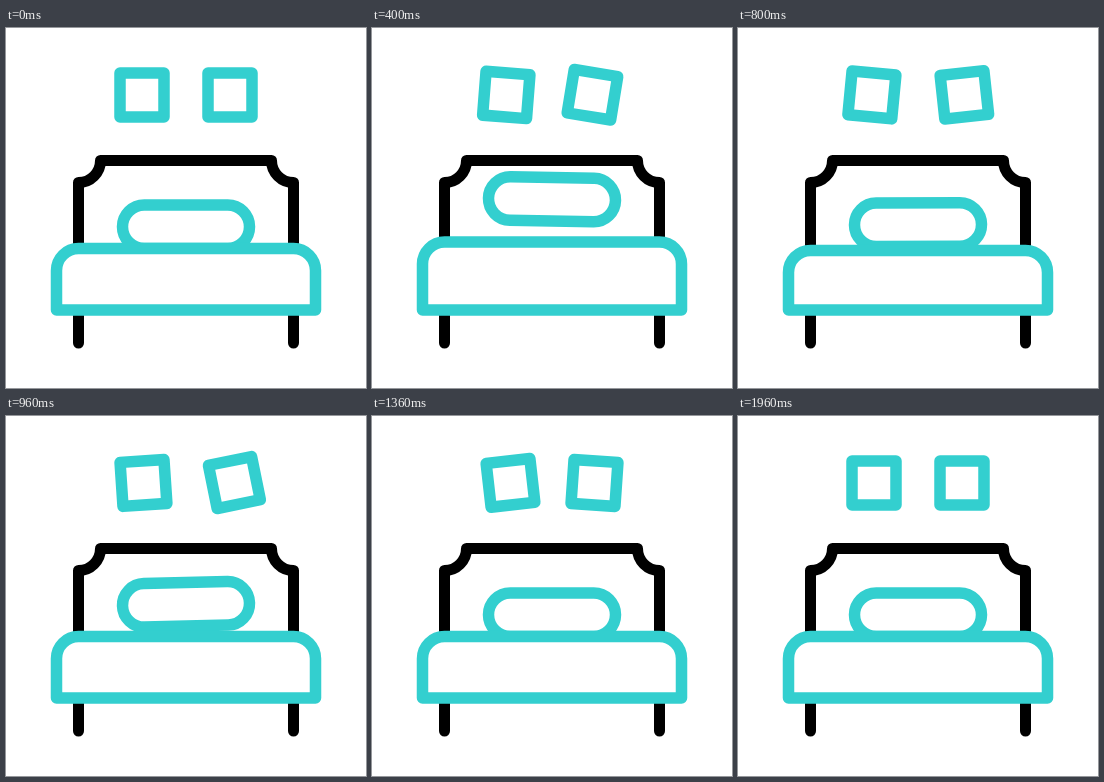
Animation of 360x360 px, one loop 2000 ms. Source, as an HTML page:

```html
<!DOCTYPE html>
<html lang="en">
<head>
<meta charset="utf-8">
<title>Bed</title>
<style>
html, body { margin: 0; width: 100%; height: 100%; overflow: hidden; background: #fff; }
svg { display: block; width: 100vw; height: 100vh; }
</style>
</head>
<body>
<svg viewBox="0 0 360 360" fill="none" stroke="#33cfcf" stroke-width="11.5" stroke-linecap="round" stroke-linejoin="round">
  <rect id="left" x="114" y="45" width="44" height="44"/>
  <rect id="right" x="202" y="45" width="44" height="44"/>
  <path stroke="#000" stroke-width="11" d="M72.5 240V154.5A22 22 0 0 0 94.5 132.5H265.5A22 22 0 0 0 287.5 154.5V240M72.5 282V315M287.5 282V315"/>
  <rect id="pillow" x="116.5" y="177" width="127" height="43.5" rx="21.75"/>
  <path id="blanket" fill="#fff"/>
</svg>
<script>
const LOOP = 2000;
const [left, right, pillow, blanket] =
  ["left", "right", "pillow", "blanket"].map(id => document.getElementById(id));

// Keys are [time, value] pairs, eased in and out between neighbours.
const leftKeys = [[220, 0], [620, 10.5], [1190, -11.5], [1680, 7], [1960, 0]];
const rightKeys = [[20, 0], [480, 10], [960, -11.5], [1440, 5], [1920, 0]];
const blanketKeys = [[60, 0], [390, -6.5], [660, 3.5], [960, 0]];

function tween(keys, t) {
  if (t <= keys[0][0]) return keys[0][1];
  for (let i = 1; i < keys.length; i++) {
    const [t0, a] = keys[i - 1], [t1, b] = keys[i];
    if (t < t1) return a + (b - a) * (1 - Math.cos(Math.PI * (t - t0) / (t1 - t0))) / 2;
  }
  return keys[keys.length - 1][1];
}

// Parabolic jump, 0 at both ends and 1 at the top.
function hop(t, start, end) {
  const u = (t - start) / (end - start);
  return Math.max(0, 4 * u * (1 - u));
}

function draw(now) {
  const t = now % LOOP;
  left.setAttribute("transform", `rotate(${tween(leftKeys, t)} 136 45)`);
  right.setAttribute("transform", `rotate(${tween(rightKeys, t)} 224 45)`);

  const big = hop(t, 60, 780), small = hop(t, 780, 1180);
  pillow.setAttribute("transform",
    `translate(0 ${-27.5 * big - 10.5 * small}) rotate(${big - 1.4 * small} 180 198.5)`);

  const y = 220.5 + tween(blanketKeys, t);
  blanket.setAttribute("d",
    `M50.5 282V${y + 22}a22 22 0 0 1 22 -22H287.5a22 22 0 0 1 22 22V282Z`);
}

function loop() {
  draw(performance.now());
  requestAnimationFrame(loop);
}
loop();
</script>
</body>
</html>
```
